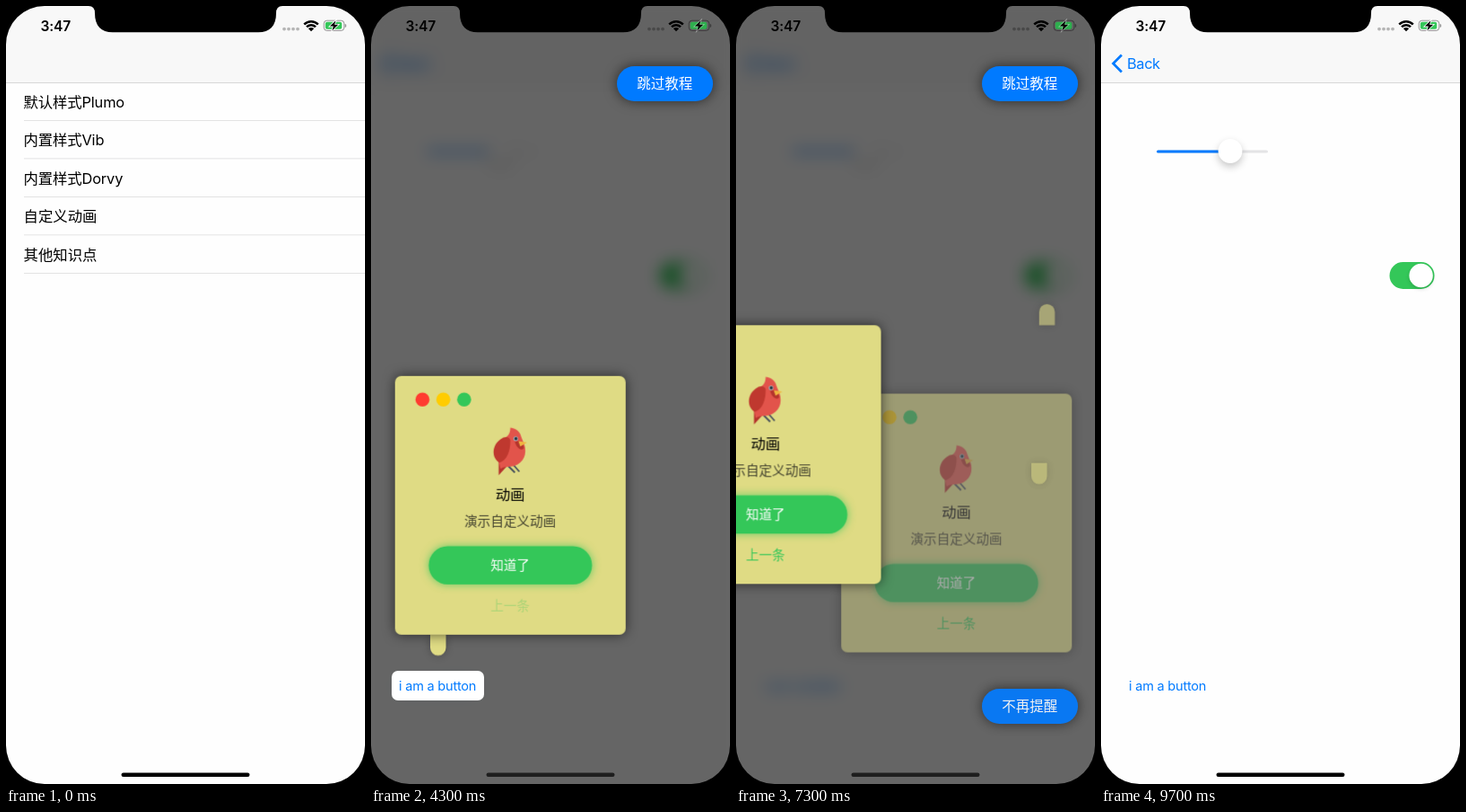
These frames come from a looping animation (400 by 866 pixels, 9800 ms). An HTML page with a canvas:

```html
<!DOCTYPE html>
<html lang="zh">
<head>
<meta charset="utf-8">
<style>
html, body { margin: 0; width: 100%; height: 100%; overflow: hidden; background: #000; }
canvas { display: block; }
</style>
</head>
<body>
<canvas id="stage" width="400" height="866"></canvas>
<script>
const W = 400, H = 866, LOOP = 9800;
const BLUE = '#007aff', GREEN = '#34c759', SAND = '#dfdb84', PAGE = '#fefefe';
const FONT = 'Inter, "Noto Sans CJK SC", "Noto Sans CJK", sans-serif';
const stage = document.getElementById('stage').getContext('2d');

const clamp = v => Math.max(0, Math.min(1, v));
const ramp = (t, start, length) => {
  const u = clamp((t - start) / length);
  return u * u * (3 - 2 * u);
};

function sprite(w, h, paint) {
  const c = document.createElement('canvas');
  c.width = w;
  c.height = h;
  paint(c.getContext('2d'));
  return c;
}

function box(g, x, y, w, h, r, fill) {
  g.beginPath();
  g.roundRect(x, y, w, h, r);
  g.fillStyle = fill;
  g.fill();
}

function disc(g, x, y, r, fill) {
  g.beginPath();
  g.arc(x, y, r, 0, 7);
  g.fillStyle = fill;
  g.fill();
}

function label(g, str, x, y, size, fill, { align = 'left', weight = 400, track = 0 } = {}) {
  g.font = `${weight} ${size}px ${FONT}`;
  g.textAlign = align;
  g.letterSpacing = track + 'px';
  g.fillStyle = fill;
  g.fillText(str, x, y);
  g.letterSpacing = '0px';
}

function shadow(g, color, blur, dy = 0) {
  g.shadowColor = color;
  g.shadowBlur = blur;
  g.shadowOffsetY = dy;
}
const noShadow = g => shadow(g, 'transparent', 0);

function put(g, img, x, y, alpha = 1) {
  if (alpha <= 0) return;
  g.globalAlpha = alpha;
  g.drawImage(img, x, y);
  g.globalAlpha = 1;
}

/* ---- pages ---- */

function navBar(g, back) {
  g.fillStyle = '#f8f8f8';
  g.fillRect(0, 0, W, 85);
  g.fillStyle = '#cfcfcf';
  g.fillRect(0, 85, W, 0.8);
  if (back <= 0) return;
  g.globalAlpha = back;
  g.strokeStyle = BLUE;
  g.lineWidth = 2.7;
  g.beginPath();
  g.moveTo(23, 54.5);
  g.lineTo(13.6, 64);
  g.lineTo(23, 73.5);
  g.stroke();
  label(g, 'Back', 29 + 40 * (1 - back), 69.8, 16.4, BLUE, { track: -0.4 });
  g.globalAlpha = 1;
}

const rows = ['默认样式Plumo', '内置样式Vib', '内置样式Dorvy', '自定义动画', '其他知识点'];

const listPage = sprite(W, H, g => {
  g.fillStyle = PAGE;
  g.fillRect(0, 0, W, H);
  rows.forEach((name, i) => {
    label(g, name, 19.5, 112.6 + i * 42.5, 16.4, '#000', { track: i < 3 ? -0.15 : 0 });
    g.fillStyle = '#dcdcdd';
    g.fillRect(20, 127 + i * 42.5, 380, 0.8);
  });
});

function toggle(g) {
  box(g, 321.5, 285, 50, 30, 15, GREEN);
  shadow(g, 'rgba(0,0,0,.15)', 4, 2);
  disc(g, 356.6, 300, 13.2, '#fff');
  noShadow(g);
}

const buttonText = g => label(g, 'i am a button', 31, 762.2, 14.5, BLUE, { track: -0.2 });

const controlPage = sprite(W, H, g => {
  g.fillStyle = PAGE;
  g.fillRect(0, 0, W, H);
  box(g, 62, 160.5, 124, 3, 1.5, '#e4e4e6');
  box(g, 62, 160.5, 80, 3, 1.5, BLUE);
  shadow(g, 'rgba(0,0,0,.22)', 9, 4);
  disc(g, 144, 161.5, 13.4, '#fff');
  noShadow(g);
  toggle(g);
  buttonText(g);
});

const tutorialBase = sprite(W, H, g => {
  g.drawImage(controlPage, 0, 0);
  navBar(g, 1);
});

const blurred = sprite(W, H, g => {
  g.fillStyle = PAGE;
  g.fillRect(0, 0, W, H);
  g.filter = 'blur(9px)';
  g.drawImage(tutorialBase, 0, 0);
});

/* ---- tutorial pieces ---- */

const PAD = 20, CARD_W = 257, CARD_H = 288;

function bird(g, x, y) {
  const shape = (d, fill) => {
    g.fillStyle = fill;
    g.fill(new Path2D(d));
  };
  g.save();
  g.translate(x, y);
  g.strokeStyle = '#46505c';
  g.lineWidth = 1.8;
  g.stroke(new Path2D('M16 42L24 50M22 41L29 49'));
  shape('M6 36V53L17 41Z', '#b5342c');
  shape('M19 0C26 1 30 5 31 10L33 15C38 25 36 36 27 41C20 45 13 42 8 46L6 38C-1 33 0 20 8 14C15 11 19 8 19 0Z', '#e2544b');
  shape('M8 13C13 9 18 10 19 14C19 27 15 36 7 39C-2 34 -2 20 8 13Z', '#bf382f');
  shape('M24 16C28 14 32 15 34 21C35 26 27 26 24 16Z', '#b5342c');
  shape('M28 15L37.5 16.5L30 21Z', '#f0b540');
  disc(g, 25, 12.3, 2.6, '#9db0bd');
  disc(g, 25.2, 12.3, 1.7, '#26323c');
  g.restore();
}

function makeCard(prevAlpha) {
  return sprite(CARD_W + PAD * 2, CARD_H + PAD * 2, g => {
    const mid = { align: 'center' }, cx = 128.3;
    g.translate(PAD, PAD);
    shadow(g, 'rgba(0,0,0,.6)', 14);
    box(g, 0, 0, CARD_W, CARD_H, 7, SAND);
    noShadow(g);
    ['#ff3b30', '#ffcc00', GREEN].forEach((c, i) => disc(g, 30.6 + i * 23.2, 26.2, 7.8, c));
    bird(g, 109.5, 57.5);
    label(g, '动画', cx, 138, 16.4, '#000', { align: 'center', weight: 500 });
    label(g, '演示自定义动画', cx, 166.8, 14.6, '#44432f', mid);
    shadow(g, 'rgba(52,199,89,.75)', 10);
    box(g, 37.5, 189.5, 182, 42.5, 21.2, GREEN);
    noShadow(g);
    label(g, '知道了', cx, 216, 14.5, '#fff', mid);
    g.globalAlpha = prevAlpha;
    label(g, '上一条', cx, 261, 14.5, GREEN, mid);
  });
}
const firstCard = makeCard(0.3), nextCard = makeCard(1);

const makePill = str => sprite(150, 80, g => {
  shadow(g, 'rgba(0,0,0,.6)', 14);
  box(g, PAD, PAD, 107, 39, 19.5, BLUE);
  noShadow(g);
  label(g, str, PAD + 53.2, PAD + 25.2, 15.5, '#fff', { align: 'center' });
});
const skipPill = makePill('跳过教程'), neverPill = makePill('不再提醒');

const makeTail = radii => sprite(58, 64, g => {
  shadow(g, 'rgba(0,0,0,.3)', 10);
  box(g, PAD, PAD, 17.5, 23.5, radii, SAND);
});
const tailDown = makeTail([0, 0, 8.7, 8.7]), tailUp = makeTail([8.7, 8.7, 0, 0]);

const buttonHole = sprite(W, H, g => {
  box(g, 23, 740, 103, 33, 7, '#fff');
  buttonText(g);
});
const toggleHole = sprite(W, H, toggle);

const steps = [
  { x: 26.7, y: 411.8, card: firstCard, tail: tailDown, tx: 66, ty: 699.5, hole: buttonHole },
  { x: 123.8, y: 355.3, card: nextCard, tail: tailUp, tx: 337.7, ty: 331.8, hole: toggleHole },
  { x: 117.2, y: 431.5, card: nextCard, tail: tailDown, tx: 318.7, ty: 719 }
];

const mix = (a, b, p) => a + (b - a) * p;
const card = (g, s, dx, a) => put(g, s.card, s.x + dx - PAD, s.y - PAD, a);
const tail = (g, s, x, y, a) => put(g, s.tail, x - PAD, y - PAD, a);
const hole = (g, s, a) => s.hole && put(g, s.hole, 0, 0, clamp(a));

const overlay = document.createElement('canvas');
overlay.width = W;
overlay.height = H;
const og = overlay.getContext('2d');

function guide(t) {
  const p1 = ramp(t, 4400, 1250), p2 = ramp(t, 6500, 1700);
  const i = p2 > 0 ? 1 : 0, p = i ? p2 : p1;
  const from = steps[i], to = steps[i + 1];
  og.clearRect(0, 0, W, H);
  hole(og, from, 1 - 2.2 * p);
  hole(og, to, 2 * p - 1);
  put(og, skipPill, 274 - PAD, 67 - PAD);
  put(og, neverPill, 274 - PAD, 760 - PAD, clamp(2 * p2));
  card(og, to, 0, p);
  tail(og, to, mix(from.tx, to.tx, p), mix(from.ty, to.ty, p), p);
  if (p < 1) {
    tail(og, from, from.tx, from.ty, 1 - p);
    card(og, from, -480 * p, 1);
  }
}

/* ---- phone frame ---- */

function statusBar(g, dim) {
  label(g, '3:47', 55.3, 27.6, 15.6, '#000', { align: 'center', weight: 600, track: -0.2 });
  for (let i = 0; i < 4; i++) disc(g, 310 + i * 5, 25.6, 1.9, 'rgba(0,0,0,.27)');

  g.save();
  g.beginPath();
  g.moveTo(340, 28.2);
  g.lineTo(329, 17.2);
  g.lineTo(329, 10);
  g.lineTo(351, 10);
  g.lineTo(351, 17.2);
  g.clip();
  g.strokeStyle = '#000';
  g.lineWidth = 2.5;
  [10.8, 6.8].forEach(r => {
    g.beginPath();
    g.arc(340, 28, r, 0, 7);
    g.stroke();
  });
  disc(g, 340, 28, 4, '#000');
  g.restore();

  g.strokeStyle = 'rgba(0,0,0,.4)';
  g.lineWidth = 1;
  g.beginPath();
  g.roundRect(354.2, 16.2, 22.6, 11.2, 3.4);
  g.stroke();
  box(g, 377.7, 20, 1.4, 4, [0, 1.4, 1.4, 0], 'rgba(0,0,0,.4)');
  box(g, 355.8, 17.8, 18.4, 8, 2, GREEN);
  g.fillStyle = `rgba(0,0,0,${0.12 * dim})`;
  g.fillRect(355.8, 17.8, 18.4, 8);
  const bolt = new Path2D('M367.5 16.2L360.8 22.6H364.8L363.3 27.4L370.2 20.8H366Z');
  g.lineWidth = 1.6;
  g.strokeStyle = `rgba(255,255,255,${1 - 0.6 * dim})`;
  g.stroke(bolt);
  g.fillStyle = '#000';
  g.fill(bolt);
}

const bezel = new Path2D();
bezel.rect(0, 0, W, H);
bezel.roundRect(0, 0, W, H, 43);
const notch = new Path2D('M92 0Q99 0 99 8C99 22 106 29.3 119 29.3H281C294 29.3 301 22 301 8Q301 0 308 0Z');

function phone(g, dim) {
  statusBar(g, dim);
  const k = Math.round(30 * dim);
  box(g, 128.5, 853.5, 143, 4.6, 2.3, `rgb(${k},${k},${k})`);
  g.fillStyle = '#000';
  g.fill(bezel, 'evenodd');
  g.fill(notch);
}

/* ---- timeline ---- */

function push(g, t) {
  const u = clamp((t - 1670) / 510), p = 1 - (1 - u) ** 3;
  g.drawImage(listPage, -120 * p, 0);
  if (u > 0 && u < 1) {
    g.globalCompositeOperation = 'multiply';
    g.fillStyle = '#dcdcdd';
    g.fillRect(-120 * p, 212.8, W, 42.5);
    g.globalCompositeOperation = 'source-over';
    g.fillStyle = `rgba(0,0,0,${0.1 * p})`;
    g.fillRect(0, 85, W, H);
  }
  if (u > 0) g.drawImage(controlPage, W * (1 - p), 0);
  navBar(g, p);
}

function render(t) {
  const g = stage;
  const out = 1 - ramp(t, 8700, 800);
  const dim = ramp(t, 2450, 740) * out;
  push(g, t);
  if (dim > 0) {
    put(g, blurred, 0, 0, dim);
    g.fillStyle = `rgba(0,0,0,${0.6 * dim})`;
    g.fillRect(0, 0, W, H);
    guide(t);
    put(g, overlay, 0, 0, ramp(t, 2450, 550) * out);
  }
  phone(g, dim);
}

const start = performance.now();
function tick() {
  render((performance.now() - start) % LOOP);
  requestAnimationFrame(tick);
}
tick();
</script>
</body>
</html>
```
